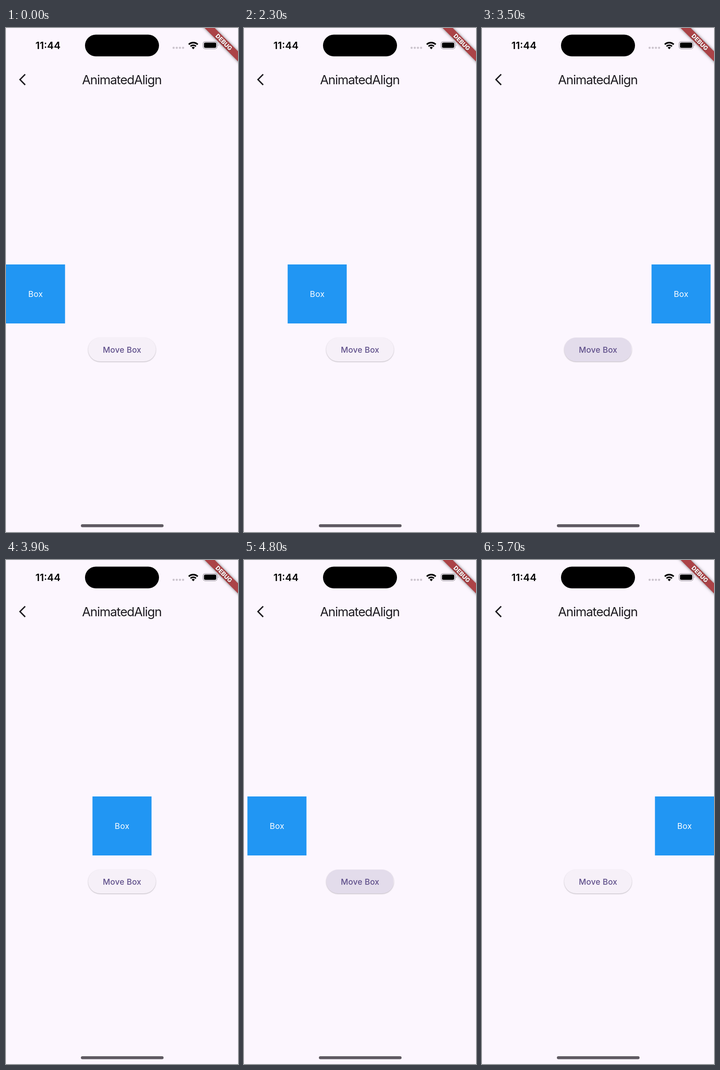
An HTML page that plays this animation: 508 px wide and 1102 px high, repeating every 5.8 s.

```html
<!DOCTYPE html>
<html lang="en">
<head>
<meta charset="utf-8">
<title>AnimatedAlign</title>
<style>
  html, body { margin: 0; width: 100%; height: 100%; overflow: hidden; background: #fcf6fe; }
  svg { display: block; width: 100%; height: 100%; font-family: Inter, "Open Sans", sans-serif; }
  .banner { filter: drop-shadow(0 0 3px #0008); }
  .button { filter: drop-shadow(0 1.5px 1.2px #0004); }
  .debug { text-shadow: 0 1px 2px #0006; }
</style>
</head>
<body>
<svg viewBox="0 0 508 1102">
  <defs>
    <clipPath id="pill"><rect x="180" y="677" width="148" height="52" rx="26"/></clipPath>
  </defs>

  <!-- status bar -->
  <text x="64.5" y="46" font-size="22" font-weight="600">11:44</text>
  <rect x="173" y="14.5" width="162" height="47.5" rx="23.75"/>
  <path d="M367 43.3h.01m6.9 0h.01m6.9 0h.01m6.9 0h.01" stroke="#cbc4cd" stroke-width="4.8" stroke-linecap="round"/>
  <g fill="none" stroke="#000" stroke-width="3.4">
    <path d="M400.2 36a14 14 0 0 1 19.6 0M404 40.1a8.6 8.6 0 0 1 12 0"/>
    <path d="M406.6 42.7a4.8 4.8 0 0 1 6.8 0L410 46.4z" fill="#000" stroke="none"/>
  </g>
  <rect x="431.4" y="29.6" width="31" height="16" rx="5" fill="none" stroke="#a39da6" stroke-width="1.3"/>
  <rect x="433.5" y="31.7" width="26.8" height="11.8" rx="3.3"/>
  <path d="M464 35.2q2.2 2.4 0 4.8z" fill="#a39da6"/>

  <!-- app bar -->
  <path d="M42 101.2L30.6 112.8L42 124.4" fill="none" stroke="#1d1b20" stroke-width="3"/>
  <text x="166.4" y="123" font-size="27.5" letter-spacing="-1.1" fill="#1d1b20">AnimatedAlign</text>

  <g id="box">
    <rect y="517" width="129.3" height="129" fill="#2196f3"/>
    <text x="64.9" y="588" font-size="17.6" letter-spacing=".35" text-anchor="middle" fill="#fff">Box</text>
  </g>

  <rect class="button" x="180" y="677" width="148" height="52" rx="26" fill="#f6f0f8"/>
  <g clip-path="url(#pill)" fill="#65558f">
    <rect id="highlight" x="180" y="677" width="148" height="52"/>
    <circle id="ripple"/>
  </g>
  <text x="254.2" y="710" font-size="17.6" font-weight="500" letter-spacing=".2" text-anchor="middle" fill="#5f4f8a">Move Box</text>

  <rect x="164" y="1085" width="181" height="6.6" rx="3.3" fill="#5f5a62"/>

  <!-- corner banner -->
  <path class="banner" d="M425 -10H447L518 61V83z" fill="#ab4347"/>
  <text class="debug" transform="translate(477 31) rotate(45)" y="4.6" font-size="13" font-weight="800" text-anchor="middle" fill="#fff">DEBUG</text>
</svg>

<script>
const LOOP = 5800, STEP = 100, TRAVEL = 378.7, TINT = 0.1;
const PRESSES = [
  { down: 1701, up: 1920, start: 2013, length: 825 },
  { down: 3250, up: 3400, start: 3400, length: 1000 },
  { down: 4550, up: 4700, start: 4700, length: 1000 },
];

const clamp = v => Math.min(1, Math.max(0, v));
const mix = (a, b, k) => a + (b - a) * k;
const $ = id => document.getElementById(id);
const set = (id, attrs) => {
  for (const key in attrs) $(id).setAttribute(key, attrs[key]);
};

function bezier(x1, y1, x2, y2) {
  const at = (a, b, s) => 3 * a * s * (1 - s) ** 2 + 3 * b * s * s * (1 - s) + s ** 3;
  return x => {
    if (x <= 0 || x >= 1) return clamp(x);
    let lo = 0, hi = 1;
    for (let i = 0; i < 24; i++) {
      const mid = (lo + hi) / 2;
      if (at(x1, x2, mid) < x) lo = mid; else hi = mid;
    }
    return at(y1, y2, lo);
  };
}
const ease = bezier(0.25, 0.1, 0.25, 1);
const easeInOut = bezier(0.42, 0, 0.58, 1);

// Each press toggles the box between the left and right edge.
function boxX(t) {
  return PRESSES.reduce((x, p, i) =>
    mix(x, i % 2 ? 0 : TRAVEL, easeInOut(clamp((t - p.start) / p.length))), 0);
}

function drawPress(t) {
  const p = PRESSES.findLast(q => t >= q.down) || { down: LOOP, up: LOOP };
  const held = Math.min(t, p.up) - p.down;
  const released = Math.max(0, t - p.up);

  const glow = clamp(clamp(held / 200) - released / 200);
  set("highlight", { "fill-opacity": TINT * glow });

  // The ripple creeps while held, rushes on release, then fades.
  const grown = ease(clamp(held / 1000 + released / 225));
  const fade = clamp((t - p.down) / 75) * clamp((375 - released) / 150);
  set("ripple", {
    cx: mix(229, 254, grown),
    cy: mix(708.5, 703, grown),
    r: mix(23.5, 83, grown),
    "fill-opacity": TINT * fade,
  });
}

function draw() {
  // Ten pictures a second, with a little slack for late callbacks.
  const t = Math.floor(performance.now() % LOOP / STEP + 0.1) * STEP % LOOP;
  set("box", { transform: `translate(${boxX(t)} 0)` });
  drawPress(t);
  requestAnimationFrame(draw);
}
draw();
</script>
</body>
</html>
```
